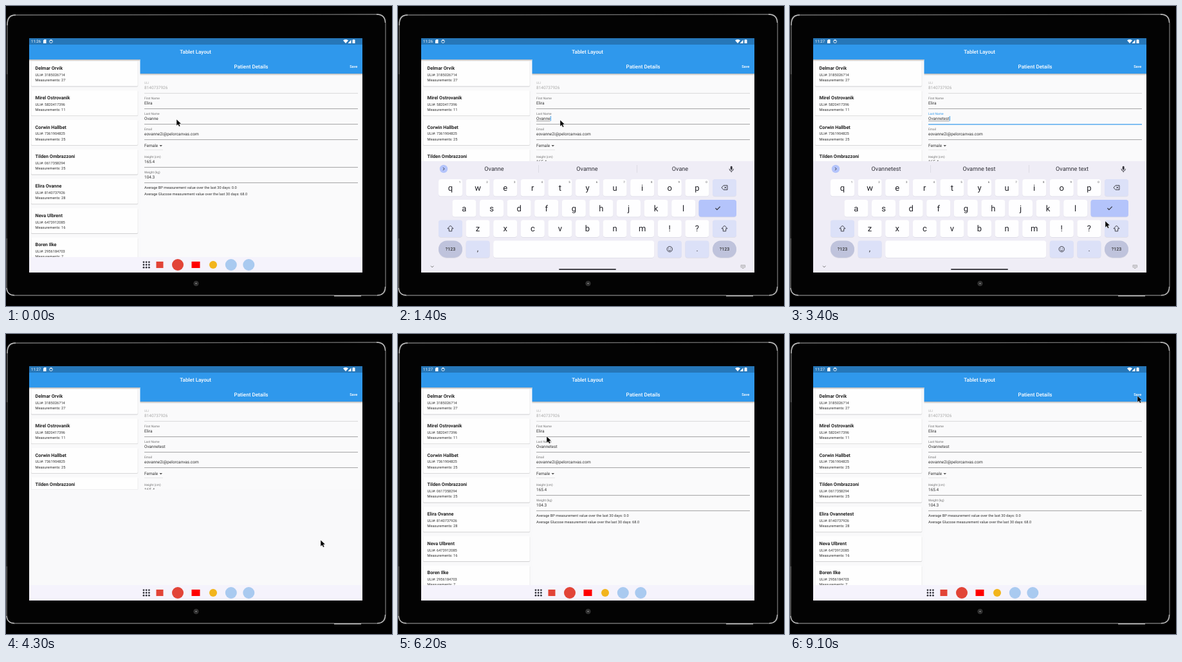
Recreate the animation shown at these times as an HTML page. Size 600 by 466 pixels, loop 9.2 s.

```html
<!DOCTYPE html>
<html lang="en">
<head>
<meta charset="utf-8">
<title>Tablet Layout</title>
<style>
html, body { margin: 0; width: 100%; height: 100%; overflow: hidden; background: #000; }
svg { display: block; width: 100%; height: 100%; font-family: Roboto, sans-serif; text-rendering: geometricPrecision; }
</style>
</head>
<body>
<svg id="stage" viewBox="0 0 600 466">
  <defs>
    <clipPath id="screen"><rect x="36" y="50" width="518" height="364"/></clipPath>
    <clipPath id="body"><rect id="fold" x="36" y="83" width="518" height="307"/></clipPath>
    <linearGradient id="shade" x2="0" y2="1">
      <stop offset="0" stop-color="#000" stop-opacity=".28"/>
      <stop offset="1" stop-color="#000" stop-opacity="0"/>
    </linearGradient>
  </defs>
  <rect width="600" height="466"/>
  <g fill="none">
    <path d="M14 14L577 13Q590 13 590 27V437Q590 449 577 449.500L13 449.500Q1 449 1 436L2 26Q2 14 14 14Z" fill="#030303" stroke="#747474" stroke-width="1.300"/>
    <path d="M2 30Q2 14 15 14M576 13Q589 13 589.500 26M589.500 436Q589 449 577 449.500M13 449.500Q1.500 449 1 438" stroke="#bbb" stroke-width="1.300"/>
    <path d="M510 450.500H552" stroke="#ddd"/>
    <path d="M1.500 106V361" stroke="#222" stroke-width="1.500"/>
    <circle cx="295.500" cy="431" r="3.600" fill="#292929" stroke="#3c3c3c"/>
    <circle cx="295.500" cy="431" r="1.300" fill="#777"/>
  </g>
  <g clip-path="url(#screen)">
    <rect x="36" y="50" width="518" height="364" fill="#f9f9fa"/>
    <g clip-path="url(#body)">
      <g id="list"></g>
      <rect x="208.500" y="83" width="346" height="331" fill="#fafafb"/>
      <rect x="36" y="83" width="172" height="3" fill="url(#shade)"/>
      <rect x="208.500" y="83" width="346" height="22" fill="#2f98ec"/>
      <rect x="208.500" y="105" width="346" height="3" fill="url(#shade)"/>
      <g id="form"></g>
    </g>
    <rect x="36" y="50" width="518" height="10.500" fill="#2677b9"/>
    <rect x="36" y="60" width="518" height="23" fill="#2f98ec"/>
    <g id="bar" fill="#fff">
      <path d="M58 53.500L59.500 52H62.500V58H58ZM524 53.500Q528 50.700 532 53.500L528 58ZM536.500 52.500V58H531.500ZM538.500 52.500H539.700V52H541.300V52.500H542.500V58H538.500Z"/>
      <circle cx="70" cy="55" r="2.400" fill="none" stroke="#fff" stroke-width=".8"/>
      <path d="M68.200 54H71.800L70 52.300Z"/>
    </g>
    <rect id="gap" x="36" y="390" width="518" height="24" fill="#000"/>
    <g id="dock"></g>
    <g id="keys"></g>
  </g>
  <path id="mouse" d="M0 0V10L2.300 8L4 11.300L5.800 10.400L4.200 7.200L7.200 6.800Z" fill="#000" stroke="#fff" stroke-width=".45"/>
</svg>
<script>
const NS = 'http://www.w3.org/2000/svg';
const $ = id => document.getElementById(id);

function add(parent, tag, attrs, text) {
  const el = document.createElementNS(NS, tag);
  for (const k in attrs) el.setAttribute(k, attrs[k]);
  if (text !== undefined) el.textContent = text;
  parent.appendChild(el);
  return el;
}
const label = (p, x, y, size, text, more = {}) =>
  add(p, 'text', { x, y, 'font-size': size, fill: '#333', ...more }, text);
const box = (p, x, y, width, height, fill, rx = 0) =>
  add(p, 'rect', { x, y, width, height, fill, rx });
const icon = (p, d, more = {}) =>
  add(p, 'path', { d, fill: 'none', stroke: '#303038', 'stroke-width': 0.9, ...more });
const mid = { 'text-anchor': 'middle' };

// Patient list
const people = [
  ['Delmar Orvik', '3185026714', 27],
  ['Mirel Ostrovanik', '5820417396', 11],
  ['Corwin Hallbet', '7361904825', 25],
  ['Tilden Ombrazzoni', '0617358294', 25],
  ['Elira Ovanne', '8140737926', 28],
  ['Neva Ulbrent', '6473912085', 16],
  ['Boren Ilke', '2956184703', 7]
];
const names = people.map(([name, uli, count], i) => {
  const y = 85.5 + i * 45.7, p = $('list');
  box(p, 38.5, y + 0.5, 167, 39.3, '#ececed', 1.5);
  box(p, 39.2, y + 1, 165.6, 38.9, '#d2d2d3', 1.5);
  box(p, 39.2, y, 165.6, 39, '#fefefe', 1.5);
  label(p, 45.5, y + 23.5, 5.67, 'ULI#: ' + uli);
  label(p, 45.5, y + 31.7, 5.67, 'Measurements: ' + count);
  return label(p, 45.5, y + 13.7, 7.3, name, { 'font-weight': 700, fill: '#222' });
});

// Detail form
const form = $('form');
function field(y, title, value, tone = '#333', line = '#8c8c8c') {
  return {
    title: label(form, 215, y + 1.7, 4.86, title, { fill: tone === '#333' ? '#707070' : '#b5b5b5' }),
    value: label(form, 215, y + 10.4, 6.47, value, { fill: tone }),
    line: box(form, 215, y + 16.3, 332, 0.8, line)
  };
}
label(form, 381, 97, 8.1, 'Patient Details', { ...mid, fill: '#fff', 'font-weight': 500 });
label(form, 540.3, 96, 5.67, 'Save', { ...mid, fill: '#fff', 'font-weight': 500 });
field(119, 'ULI', '8140737926', '#a6a6a6', '#cfcfcf');
field(143, 'First Name', 'Elira');
const last = field(167, 'Last Name', 'Ovanne');
field(191, 'Email', 'eovanne2i@pelorcanvas.com');
label(form, 215, 219.2, 6.47, 'Female');
icon(form, 'M238.500 216H243L240.700 218.400Z', { fill: '#555', stroke: 'none' });
box(form, 215, 223, 29, 0.5, '#d0d0d0');
field(234, 'Height (cm)', '165.4');
field(258, 'Weight (kg)', '104.3');
label(form, 215, 283.5, 5.67, 'Average BP measurement value over the last 30 days: 0.0');
label(form, 215, 294, 5.67, 'Average Glucose measurement value over the last 30 days: 68.0');
const under = box(form, 215, 178.6, 20, 0.5, '#444');
const caret = box(form, 236, 171, 0.9, 7.5, '#2f98ec');

// Bars
label($('bar'), 294.7, 74.3, 8.1, 'Tablet Layout', { ...mid, fill: '#fff', 'font-weight': 500 });
const clock = label($('bar'), 39, 57.4, 6.1, '11:26', { fill: '#fff' });

// Dock
const dockBack = box($('dock'), 36, 390, 518, 24, '#f5f3fc');
const apps = add($('dock'), 'g', {});
for (let i = 0; i < 9; i++)
  add(apps, 'circle', { cx: -81.5 + i % 3 * 4.2, cy: (Math.floor(i / 3) - 1) * 4.2, r: 1.4, fill: '#34343c' });
box(apps, -62, -5, 11, 10, '#e24437');
add(apps, 'circle', { cx: -28.5, cy: 0, r: 9, fill: '#e24437' });
box(apps, -7, -5, 13, 10, '#f00', 0);
add(apps, 'circle', { cx: 26.5, cy: 0, r: 6, fill: '#f2b51d' });
for (const cx of [54.3, 81.8])
  add(apps, 'circle', { cx, cy: 0, r: 9, fill: '#a9caf0' });

// Keyboard
const kb = $('keys'), PITCH = 42.6, SOFT = '#dce1f8', ACCENT = '#b4c4fb', GREY = '#bfc3dc';
box(kb, 36, 241, 518, 173, '#efedf6');
const rowY = [269, 301, 332.5, 364.5];
const key = (x, row, w, fill, rx = 4) => {
  box(kb, x, rowY[row] + 0.6, w, 26.6, '#dcdbe5', rx);
  box(kb, x, rowY[row], w, 26.4, fill, rx);
};
[['qwertyuiop', 63], ['asdfghjkl', 84.4], ['zxcvbnm!?', 105.6]].forEach(([chars, x0], row) =>
  [...chars].forEach((c, i) => {
    const x = x0 + i * PITCH;
    key(x, row, 37, '#fefeff');
    label(kb, x + 18.5, rowY[row] + 17.8, 13, c, { ...mid, fill: '#222228' });
    if (!row) label(kb, x + 33, rowY[0] + 5.6, 4.4, (i + 1) % 10, { ...mid, fill: '#555' });
  }));
key(489, 0, 37, SOFT);
key(467.5, 1, 58.500, ACCENT);
for (const x of [63, 489]) {
  key(x, 2, 37, SOFT);
  icon(kb, `M${x + 18.5} 341l4.500 4.800h-2.300v4h-4.400v-4h-2.300Z`);
  key(x, 3, 37, GREY, 13);
  label(kb, x + 18.5, 380.3, 7, '?123', { ...mid, 'font-weight': 500 });
}
key(105.6, 3, 37, SOFT);
key(148.2, 3, 250, '#fefeff');
key(403.8, 3, 37, SOFT);
key(446.4, 3, 37, SOFT);
label(kb, 124, 381, 12, ',', mid);
label(kb, 465, 381, 12, '.', mid);
icon(kb, 'M506 278.700H512V285.500H506L503 282.100ZM507.300 280.600l3 3m0-3l-3 3');
icon(kb, 'M493.500 314l2.400 2.400l4.800-4.800', { 'stroke-width': 1.1 });
add(kb, 'circle', { cx: 422.3, cy: 377.7, r: 4.2, fill: 'none', stroke: '#303038', 'stroke-width': 0.9 });
icon(kb, 'M420 378.700q2.300 3 4.600 0M420.700 375.700v1.200m3.200-1.200v1.200');
add(kb, 'circle', { cx: 71, cy: 253, r: 6.2, fill: ACCENT });
icon(kb, 'M70 250.800l2.200 2.200l-2.200 2.200');
icon(kb, 'M515 252.800q0 3.600 3.200 3.600t3.200-3.600M518.200 256.400v2');
box(kb, 516.8, 248.8, 2.8, 5.8, '#303038', 1.4);
for (const x of [218, 371]) box(kb, x, 247, 0.7, 12, '#d5d4df');
const hints = [149.5, 294, 438.5].map(x => label(kb, x, 256.3, 9.1, '', { ...mid, fill: '#303038' }));
icon(kb, 'M51 403.700l2.200 2.200l2.200-2.200', { stroke: '#666' });
icon(kb, 'M533 402.500h6.500v3.500h-6.500Zm2 5h2.500M534 404.200h4.500', { stroke: '#999', 'stroke-width': 0.7 });
box(kb, 250, 408.300, 89, 1.6, '#2b2b30', 0.8);

// Motion
const LOOP = 9200;
const path = [
  [0, 265, 176], [300, 253, 177], [500, 252, 177], [2700, 252, 177],
  [3300, 490, 334], [3500, 490, 334], [3800, 489, 320], [4700, 489, 320],
  [5800, 231, 159], [7000, 231, 159], [8000, 540, 96], [LOOP, 540, 96]
];
const strokes = [2000, 2200, 2400, 2600];
const ramp = (t, a, b) => {
  const u = Math.min(1, Math.max(0, (t - a) / (b - a)));
  return u * u * (3 - 2 * u);
};
const show = (el, on) => el.setAttribute('display', on ? 'inline' : 'none');

function pointer(t) {
  const i = path.findIndex(p => p[0] > t);
  const [ta, xa, ya] = path[i - 1], [tb, xb, yb] = path[i];
  const u = ramp(t, ta, tb);
  return [xa + (xb - xa) * u, ya + (yb - ya) * u];
}

function draw(t) {
  $('mouse').setAttribute('transform', `translate(${pointer(t)})`);
  clock.textContent = t < 1800 ? '11:26' : '11:27';

  const typed = 'test'.slice(0, strokes.filter(s => t >= s).length);
  last.value.textContent = 'Ovanne' + typed;
  const editing = t >= 1000 && t < 4000, focus = t >= 1500 && t < 4000;
  last.title.setAttribute('fill', focus ? '#2f98ec' : '#707070');
  last.line.setAttribute('fill', focus ? '#2f98ec' : '#8c8c8c');
  last.line.setAttribute('height', focus ? 1.2 : 0.8);
  show(under, editing);
  show(caret, editing && (t - 1000) % 1000 < 500);
  const w = last.value.getComputedTextLength();
  under.setAttribute('width', w);
  caret.setAttribute('x', 215.3 + w);

  const done = typed.length === 4;
  const words = done ? ['Ovannetest', 'Ovamne test', 'Ovamne text']
    : ['Ovanne' + typed, 'Ovamne' + typed, 'Ovane' + typed];
  hints.forEach((h, i) => h.textContent = words[i]);
  names[4].textContent = 'Elira Ovanne' + (t >= 8400 ? 'test' : '');

  const up = ramp(t, 800, 1200) * (1 - ramp(t, 3900, 4200));
  show(kb, up > 0);
  kb.setAttribute('transform', `translate(0 ${173 * (1 - up)})`);
  $('fold').setAttribute('height', t >= 1200 && t < 4400 ? 158.5 : 307);

  const small = t >= 700 && t < 900 ? (t < 800 ? 0.5 : 1) : 0;
  const away = t >= 900 && t < 4100;
  show($('gap'), t >= 700 && t < 1200);
  show($('dock'), !away);
  dockBack.setAttribute('y', 390 + 8.5 * small);
  apps.setAttribute('transform', `translate(295.500 ${402 + 5.300 * small}) scale(${1 - 0.29 * small})`);
  apps.setAttribute('opacity', 1 - 0.3 * small);
}

const start = performance.now();
function tick() {
  const t = (performance.now() - start) % LOOP;
  draw(Math.floor(t / 100) * 100);
  requestAnimationFrame(tick);
}
tick();
</script>
</body>
</html>
```
